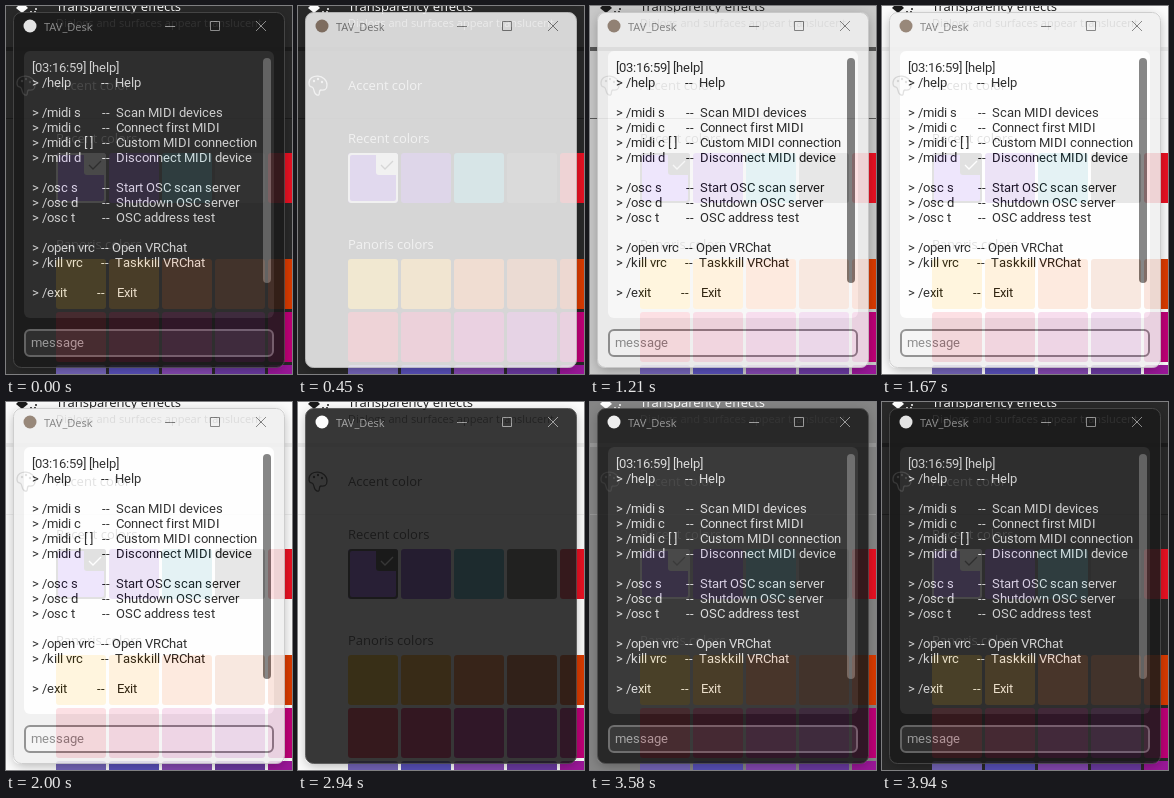
Write an HTML page that moves like this. It is 286 px wide and 368 px high and loops after 4 s.

```html
<!DOCTYPE html>
<html lang="en">
<head>
<meta charset="utf-8">
<title>Theme switch</title>
<style>
html, body { margin: 0; width: 100%; height: 100%; overflow: hidden; }
svg { display: block; }
text { white-space: pre; dominant-baseline: central; }
#desk {
  --card: color-mix(in srgb, #292929, #fbfbfb var(--cardLight));
  --page: color-mix(in srgb, #1c1c1c, #ececec var(--pageLight));
  font: 13px "Open Sans", "Noto Sans", sans-serif;
}
#desk text, .ink { fill: var(--ink); }
.line { stroke: var(--ink); fill: none; }
#win { opacity: .87; }
#win text { font: 13px Roboto, Arial, sans-serif; fill: var(--text); }
#win .title { font: 11px "Open Sans", "Noto Sans", sans-serif; fill: var(--dim); }
#win .hint text { fill: var(--hint); }
.dark { --body: #1b1b1b; --rim: #484848; --panel: #2f2f2f; --text: #e8e8e8; --dim: #999; --hint: #aaa;
  --bar: #6c6c6c; --edge: #6c6c6c; --field: #303030; --mark: #fff; }
.light { --body: #f0f0f0; --rim: #c8c8c8; --panel: #fff; --text: #151515; --dim: #777; --hint: #808080;
  --bar: #757575; --edge: #858585; --field: #f5f5f5; --mark: #8a7768; }
</style>
</head>
<body>
<svg id="stage" width="286" height="368" viewBox="0 0 286 368">
  <defs>
    <filter id="blur" x="-20%" y="-20%" width="140%" height="140%"><feGaussianBlur stdDeviation="6"/></filter>
    <clipPath id="outside"><path clip-rule="evenodd" d="M0 0h286v368H0zM15 6h256q8 0 8 8v340q0 8-8 8H15q-8 0-8-8V14q0-8 8-8z"/></clipPath>
  </defs>
  <g id="desk">
    <rect width="286" height="368" fill="var(--page)"/>
    <rect y="-9" width="286" height="50" fill="var(--card)"/>
    <rect y="45" width="286" height="323" fill="var(--card)"/>
    <rect y="112" width="286" height="1" fill="var(--page)"/>
    <path class="ink" d="M10 2l6-6 6 6-6 5z"/>
    <path class="line" d="M24-4h6v10h-8" stroke-width="1.5" stroke-dasharray="2 2"/>
    <path class="line" stroke-width="1.3" d="M11 77c0-10 18-9 18 2 0 6-4 5-6 5-3 0 0 6-4 5-4-1-2-7-5-8-2 0-3-2-3-4z"/>
    <g class="ink"><circle cx="16" cy="75" r="1.2"/><circle cx="20" cy="73" r="1.2"/><circle cx="24" cy="76" r="1.2"/></g>
    <text x="50" y="0">Transparency effects</text>
    <text x="50" y="16" style="font-size:11px" opacity=".75">Dialogs and surfaces appear translucent</text>
    <text x="50" y="79">Accent color</text>
    <text x="50" y="132">Recent colors</text>
    <text x="50" y="238">Panoris colors</text>
    <g id="tiles"></g>
    <rect x="51" y="148" width="48" height="48" rx="3" class="line" stroke-width="2"/>
    <path class="ink" d="M78 147h19q3 0 3 3v19H81q-3 0-3-3z"/>
    <path d="M83 159l4 4 8-8" fill="none" stroke="var(--card)" stroke-width="1.3"/>
  </g>
  <g clip-path="url(#outside)">
    <rect x="8" y="10" width="270" height="354" rx="8" opacity=".28" filter="url(#blur)"/>
  </g>
  <g id="win" class="dark">
    <rect x="7.5" y="6.5" width="271" height="355" rx="8" fill="var(--body)" stroke="var(--rim)"/>
    <circle cx="24" cy="20" r="6.5" fill="var(--mark)"/>
    <text class="title" x="38" y="20">TAV_Desk</text>
    <path d="M159 20.5h10M204.500 15.500h9v9h-9zM250 15l10 10m0-10l-10 10" fill="none" stroke="var(--dim)"/>
    <g id="content">
      <rect x="18" y="45" width="250" height="267" rx="6" fill="var(--panel)"/>
      <rect x="257" y="52" width="8" height="225" rx="4" fill="var(--bar)"/>
      <g id="lines"></g>
      <rect x="19" y="324" width="248" height="26" rx="5" fill="var(--field)" stroke="var(--edge)" stroke-width="2"/>
      <g id="entry" class="hint"></g>
    </g>
  </g>
</svg>
<script>
const $ = id => document.getElementById(id);

const help = `[03:16:59] [help]
> /help          --  Help

> /midi s       --  Scan MIDI devices
> /midi c       --  Connect first MIDI
> /midi c [ ]   --  Custom MIDI connection
> /midi d       --  Disconnect MIDI device

> /osc s        --  Start OSC scan server
> /osc d        --  Shutdown OSC server
> /osc t         --  OSC address test

> /open vrc  -- Open VRChat
> /kill vrc      --  Taskkill VRChat

> /exit          --    Exit`;

// Window text advances by whole pixels, as hinted desktop text does.
const pen = document.createElement("canvas").getContext("2d");
pen.font = "13px Roboto, Arial, sans-serif";
function hinted(line, x, y) {
  const xs = [...line].map(c => {
    const at = x;
    x += Math.round(pen.measureText(c).width);
    return at;
  });
  return `<text x="${xs.join(" ")}" y="${y}">${line.replace(/>/g, "&gt;")}</text>`;
}
$("lines").innerHTML = help.split("\n").map((line, i) => hinted(line, 26, 61.6 + i * 15)).join("");
$("entry").innerHTML = hinted("message", 25, 336.6);

const rows = [
  [147, "#8040e8 #6c2cc0 #2f9db0 #4c4a48 #e81123"],
  [253, "#ffb900 #ff9c00 #f7630c #ca5010 #da3b01"],
  [306, "#e81130 #d8004c #c30080 #a8109c #bf0077"],
  [359, "#7464b8 #5850b8 #8448b0 #6a3aa0 #9a1798"]
];
$("tiles").innerHTML = rows.map(([y, colors]) => colors.split(" ").map((fill, i) =>
  `<rect x="${50 + i * 53}" y="${y}" width="50" height="50" rx="3" fill="${fill}"/>`).join("")).join("");

const LOOP = 4000;
const within = (t, a, b) => t >= a && t < b;
const ramp = (t, a, b) => Math.min(1, Math.max(0, (t - a) / (b - a)));
const percent = v => (v * 100).toFixed(2) + "%";

function draw(t) {
  const desk = $("desk").style;
  const card = ramp(t, 1120, 1240) - ramp(t, 3300, 3800);
  const page = ramp(t, 1140, 1390) - ramp(t, 3340, 3940);
  desk.setProperty("--cardLight", percent(card));
  desk.setProperty("--pageLight", percent(page));
  desk.setProperty("--ink", within(t, 1150, 3330) ? "#1a1a1a" : "#fff");

  $("win").setAttribute("class", within(t, 310, 2940) ? "light" : "dark");
  const blank = within(t, 310, 580) || within(t, 2940, 3210);
  $("content").style.display = blank ? "none" : "";
}

const start = performance.now();
function tick() {
  draw((performance.now() - start) % LOOP);
  requestAnimationFrame(tick);
}
tick();
</script>
</body>
</html>
```
